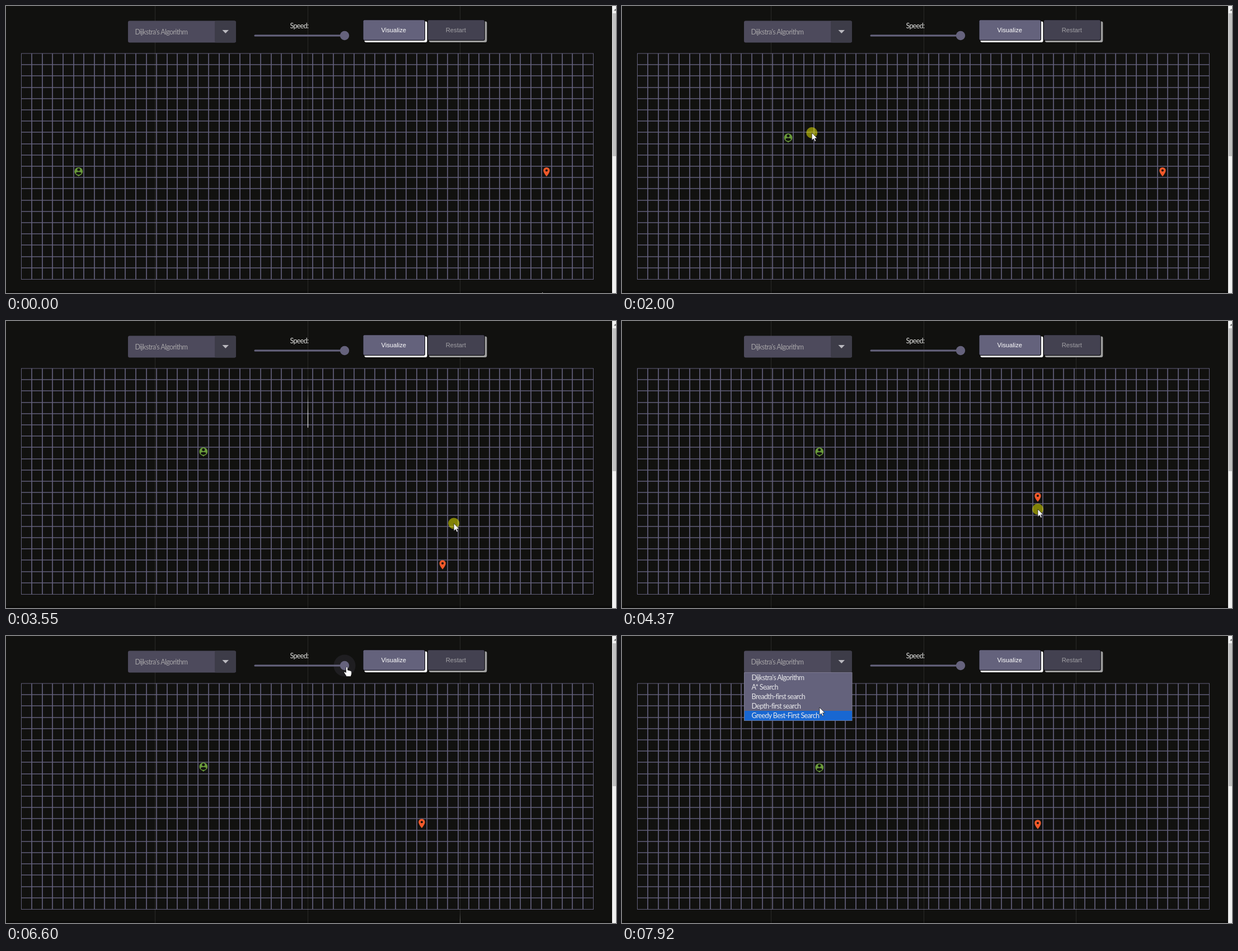
Write an HTML page that moves like this. It is 1090x514 px and loops after 7.99 s.

```html
<!DOCTYPE html>
<html lang="en">
<head>
<meta charset="utf-8">
<title>Pathfinding visualizer</title>
<style>
html, body { margin: 0; width: 100%; height: 100%; overflow: hidden; background: #11110f; }
svg { position: absolute; left: 0; top: 0; display: block; }
.ui { font: 12.5px Lato, sans-serif; letter-spacing: -.65px; }
.btn { font: 11.2px "Liberation Sans", Arial, sans-serif; text-anchor: middle; }
</style>
</head>
<body>
<svg width="1090" height="514" viewBox="0 0 1090 514">
  <defs>
    <linearGradient id="fade" x1="0" y1="0" x2="0" y2="1">
      <stop offset="0" stop-color="#fff" stop-opacity="0"/>
      <stop offset=".75" stop-color="#fff"/>
    </linearGradient>
  </defs>
  <rect width="1090" height="514" fill="#11110f"/>
  <rect y="510" width="1083" height="4" fill="#0b0b0a"/>
  <path id="grid" fill="none" stroke="#625f7a" stroke-width="1.7"/>
  <rect x="27.5" y="85" width="1022" height="404.5" fill="none" stroke="#625f7a"/>
  <g id="lines"></g>

  <g>
    <rect x="218" y="26.5" width="193" height="39" rx="3" fill="#4d4a5c"/>
    <rect x="373" y="26.5" width="38" height="39" rx="3" fill="#3d3c48"/>
    <path d="M386.5 43h11.5l-5.75 6z" fill="#b9b8be"/>
    <text class="ui" x="230.5" y="51" fill="#a5a3a6">Dijkstra's Algorithm</text>
  </g>

  <g>
    <text class="ui" x="507.5" y="40" fill="#dededc">Speed:</text>
    <rect x="443.5" y="51.5" width="162" height="3" rx="1.5" fill="#353440"/>
    <rect id="fill" x="443.5" y="51.5" height="3" rx="1.5" fill="#65627c"/>
    <circle id="halo" cy="53" r="19.5" fill="#65627c" fill-opacity=".17"/>
    <circle id="thumb" cy="53" r="8.2" fill="#65627c"/>
  </g>

  <g id="buttons"></g>

  <g id="start">
    <path d="M-4 4L0 8.2 4 4Z" fill="#699a3a"/>
    <circle cy="-.8" r="7.4" fill="#699a3a"/>
    <circle cy="-4.1" r="2.5" fill="#11110f"/>
    <path d="M-4.9 2.5C-4.9-.7 4.9-.7 4.9 2.5 2.6 6 -2.6 6 -4.9 2.5Z" fill="#11110f"/>
  </g>
  <g id="goal">
    <path d="M0 8.2C0 8.2-5.7 1.8-5.7-2.5A5.7 5.7 0 0 1 5.7-2.5C5.7 1.8 0 8.2 0 8.2Z" fill="#f1592a"/>
    <circle cy="-2.5" r="2" fill="#11110f"/>
  </g>

  <g id="menu">
    <rect x="218.5" y="65.5" width="192.5" height="86" fill="#64627c" stroke="#7c7a90"/>
    <rect id="hover" x="219" width="192" height="17.2" fill="#1867d2"/>
    <g id="options" class="ui" fill="#e8e8ea"></g>
  </g>

  <g id="pointer">
    <circle id="press" r="10" fill="#ff0" fill-opacity=".48"/>
    <path id="arrow" d="M0 0V13.6L3.2 10.7 5.3 15.4 7.4 14.5 5.4 9.9H9.6Z" fill="#fff" stroke="#111" stroke-width=".7"/>
    <path id="hand" d="M-1.5 1.5Q0-1 1.5 1.5V6L7 7.4 8.5 9V13L7 17.5H-.5L-5 10.5Q-5-1.5 9.5L-1.5 10.5Z" fill="#fff" stroke="#111" stroke-width=".7"/>
  </g>

  <rect x="1083" width="7" height="514" fill="#f1f1f1"/>
  <rect x="1084" y="13" width="6" height="256" fill="#c1c1c1"/>
  <path d="M1086 8.5l3-3.5 1 1.2v2.3z" fill="#777"/>
</svg>
<script>
const LOOP = 7990, LAG = 130;
const LEFT = 27.6, TOP = 85, CELL_W = 18.58, CELL_H = 20.2, COLS = 55, ROWS = 20;
const $ = id => document.getElementById(id);
const clamp = (v, a, b) => Math.min(b, Math.max(a, v));
const show = (el, on) => el.setAttribute('visibility', on ? 'visible' : 'hidden');
const within = (t, [a, b]) => t >= a && t < b;

$('hand').setAttribute('d', 'M-1.5 1.5Q0-1 1.5 1.5V6L7 7.4 8.5 9V13L7 17.5H-.5L-5 10.5Q-5 7.5-1.5 10.5Z');

const moveStart = [860, 2130], moveGoal = [3000, 4390], slide = [5010, 6380], click = [7060, 7150];
const overSlider = [4940, 6690], MENU_OPEN = 7150;

// Pointer path: time, x, y
const dragStart = [
  [0, 958, 512], [600, 98, 372], [860, 130, 298], [1110, 335, 215], [1240, 327, 342],
  [1350, 295, 362], [1650, 256, 310], [1870, 297, 236], [2000, 339, 227], [2110, 353, 236]
];
const dragGoal = [
  [2350, 353, 237], [2750, 650, 200], [3000, 966, 297], [3280, 900, 312], [3420, 781, 438],
  [3550, 800, 363], [3680, 845, 302], [3850, 810, 272], [4050, 765, 290], [4350, 743, 337]
];
const useControls = [
  [4480, 743, 337], [4720, 690, 170], [4930, 606, 53], [5040, 604, 54], [5360, 543, 56],
  [5700, 450, 57], [6300, 609, 55], [6660, 609, 55], [7050, 392, 46], [7170, 391, 47],
  [7430, 384, 88], [7840, 357, 143], [7920, 353, 128], [LOOP, 352, 125]
];
const path = [...dragStart, ...dragGoal, ...useControls];

// Monotone cubic interpolation along the path
function slope(i, k) {
  if (i <= 0 || i >= path.length - 1) return 0;
  const rate = j => (path[j + 1][k] - path[j][k]) / (path[j + 1][0] - path[j][0]);
  const a = rate(i - 1), b = rate(i);
  return a * b <= 0 ? 0 : 2 * a * b / (a + b);
}
function pointer(t) {
  let i = 0;
  while (i < path.length - 2 && path[i + 1][0] <= t) i++;
  const p = path[i], q = path[i + 1], d = q[0] - p[0], u = (t - p[0]) / d, v = 1 - u;
  return [1, 2].map(k =>
    p[k] * (1 + 2 * u) * v * v + slope(i, k) * d * u * v * v +
    q[k] * u * u * (3 - 2 * u) - slope(i + 1, k) * d * u * u * v);
}

// Cell centre under a dragged marker
function dragged(t, [from, to]) {
  const [x, y] = pointer(clamp(t - LAG, from, to));
  const c = clamp(Math.floor((x - LEFT) / CELL_W), 0, COLS - 1);
  const r = clamp(Math.floor((y - TOP) / CELL_H), 0, ROWS - 1);
  return [LEFT + (c + .5) * CELL_W, TOP + (r + .5) * CELL_H];
}

// cubic-bezier(.4, .26, 0, .97)
function ease(x) {
  let a = 0, b = 1;
  for (let i = 0; i < 20; i++) {
    const s = (a + b) / 2;
    if (1.2 * s * (1 - s) ** 2 + s ** 3 < x) a = s; else b = s;
  }
  return .78 * a * (1 - a) ** 2 + 2.91 * a * a * (1 - a) + a ** 3;
}

let d = '';
for (let c = 1; c < COLS; c++) d += `M${Math.round(LEFT + c * CELL_W)} 85V489.5`;
for (let r = 1; r < ROWS; r++) d += `M27.5 ${Math.round(TOP + r * CELL_H)}H1049.5`;
$('grid').setAttribute('d', d);

const drops = [[266, 5460], [539, 3221], [811, 5816]];
$('lines').innerHTML = drops.map(([x]) =>
  `<rect x="${x}" width="1" height="514" fill="#fff" fill-opacity=".1"/>` +
  `<rect class="drop" x="${x}" width="1" height="77" fill="url(#fade)"/>`).join('');
const dropEls = document.querySelectorAll('.drop');

function button(x, w, label, face, shade, ink) {
  const box = (dx, y, bw, h, r, color) =>
    `<rect x="${x + dx}" y="${y}" width="${bw}" height="${h}" rx="${r}" fill="${color}"/>`;
  return box(2, 27.5, w + 2.5, 37.5, 3, shade) + box(-1, 24.5, w + 2, 37.5, 3, '#0a0a0c') +
    box(0, 25.3, w, 35.7, 2, face) +
    `<text class="btn" x="${x + w / 2 - .5}" y="46.7" fill="${ink}">${label}</text>`;
}
$('buttons').innerHTML = button(638.5, 109.5, 'Visualize', '#64627c', '#fff', '#fff') +
  button(753.8, 101, 'Restart', '#434150', '#a0a0a0', '#a2a1a5');

$('options').innerHTML = ["Dijkstra's Algorithm", 'A* Search', 'Breadth-first search',
  'Depth-first search', 'Greedy Best-First Search']
  .map((s, i) => `<text x="231.5" y="${79 + 17 * i}">${s}</text>`).join('');

function place(id, [x, y]) {
  $(id).setAttribute('transform', `translate(${x.toFixed(2)} ${y.toFixed(2)})`);
}

function draw(t) {
  const bob = Math.cos(t * Math.PI / 500) - 1;
  for (const [id, span] of [['start', moveStart], ['goal', moveGoal]]) {
    const [x, y] = dragged(t, span);
    place(id, [x, y + bob]);
  }

  drops.forEach(([, begin], i) => {
    const u = (t - begin) / 1400;
    show(dropEls[i], u > 0 && u < 1);
    dropEls[i].setAttribute('y', -257 + 822 * ease(clamp(u, 0, 1)));
  });

  const knobX = pointer(clamp(t, ...slide))[0];
  const value = Math.round(clamp((knobX - 444) / 161, 0, 1) * 4) / 4;
  const x = 444 + 161 * value;
  $('fill').setAttribute('width', x - 443.5);
  $('thumb').setAttribute('cx', x);
  $('halo').setAttribute('cx', x);
  const hot = within(t, overSlider);
  show($('halo'), hot && t > 4990);

  show($('menu'), t >= MENU_OPEN);
  const row = clamp(Math.floor((pointer(Math.max(0, t - 90))[1] - 66) / 17), 0, 4);
  $('hover').setAttribute('y', 66 + 17 * row);

  place('pointer', pointer(t));
  show($('press'), [moveStart, moveGoal, slide, click].some(s => within(t, s)));
  show($('hand'), hot);
  show($('arrow'), !hot);
}

const origin = performance.now();
function tick() {
  draw((performance.now() - origin) % LOOP);
  requestAnimationFrame(tick);
}
draw(0);
requestAnimationFrame(tick);
</script>
</body>
</html>
```
